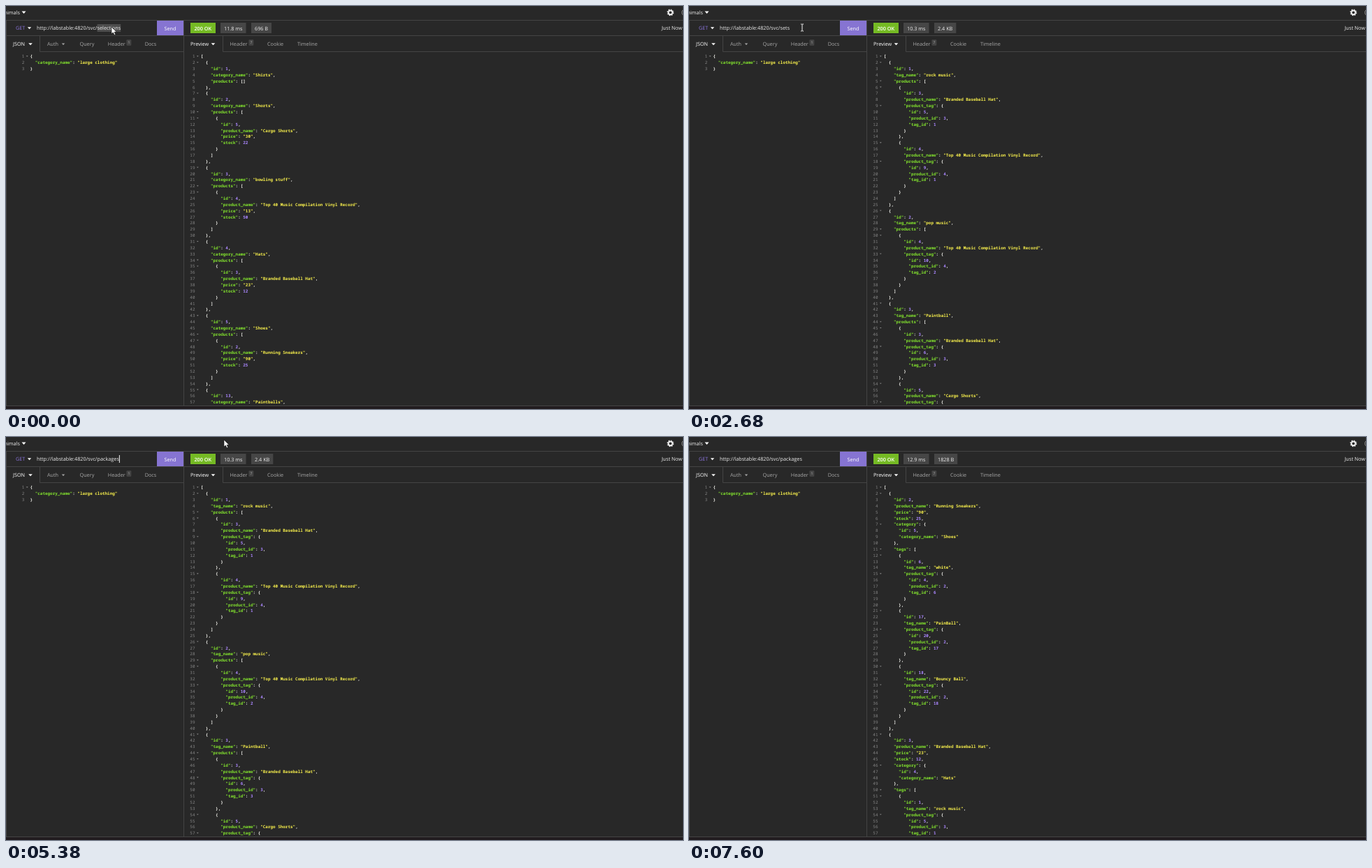
An HTML page that plays this animation: 969x578 px, repeating every 7.99 s.

```html
<!DOCTYPE html>
<html lang="en">
<head>
<meta charset="utf-8">
<title>API client</title>
<style>
  html, body { margin: 0; width: 100%; height: 100%; overflow: hidden; background: #282828; }
  svg { display: block; width: 969px; height: 578px; }
  text { font: 7.28px "Open Sans", "Noto Sans", sans-serif; fill: #eee; white-space: pre; text-rendering: geometricPrecision; }
  .code text { font: 600 5.94px "Noto Sans Mono", "DejaVu Sans Mono", monospace; fill: #f8f8f2; }
  .code .num { font-weight: 400; fill: #868686; text-anchor: end; }
  .code .key { fill: #82e22e; }
  .code .str { fill: #f6ee4c; }
  .code .val { fill: #ab87ff; }
  .mid { text-anchor: middle; }
  .rule { stroke: #444; fill: none; }
</style>
</head>
<body>
<svg id="stage" viewBox="0 0 969 578"></svg>
<script>
const LOOP = 7990;
const stage = document.getElementById('stage');

function add(parent, tag, attrs = {}, content = '') {
  const el = document.createElementNS('http://www.w3.org/2000/svg', tag);
  for (const name in attrs) el.setAttribute(name, attrs[name]);
  el.textContent = content;
  parent.append(el);
  return el;
}
const group = (parent, attrs) => add(parent, 'g', attrs);
const label = (parent, x, y, content, attrs) => add(parent, 'text', { x, y, ...attrs }, content);
const box = (parent, x, y, width, height, fill, attrs) => add(parent, 'rect', { x, y, width, height, fill, ...attrs });
const rule = (parent, d) => add(parent, 'path', { d, class: 'rule' });
const caretDown = (parent, x, y, fill, w = 6) =>
  add(parent, 'path', { d: `M${x - w / 2} ${y - w * .28}h${w}l${-w / 2} ${w * .56}z`, fill });
const show = (el, on) => el.setAttribute('visibility', on ? 'visible' : 'hidden');

// ---- JSON documents ----
const hat = 'Branded Baseball Hat', vinyl = 'Top 40 Music Compilation Vinyl Record';
const item = (id, product_name, price, stock) => ({ id, product_name, price, stock });
const category = (id, category_name, ...products) => ({ id, category_name, products });
const link = (id, product_id, tag_id) => ({ id, product_id, tag_id });
const tagged = (id, product_name, linkId, tagId) => ({ id, product_name, product_tag: link(linkId, id, tagId) });
const tag = (id, tag_name, ...products) => ({ id, tag_name, products });
const tagOf = (id, tag_name, linkId, productId) => ({ id, tag_name, product_tag: link(linkId, productId, id) });

const categories = [
  category(1, 'Shirts'),
  category(2, 'Shorts', item(5, 'Cargo Shorts', '30', 22)),
  category(3, 'bowling stuff', item(4, vinyl, '13', 50)),
  category(4, 'Hats', item(3, hat, '23', 12)),
  category(5, 'Shoes', item(2, 'Running Sneakers', '90', 25)),
  category(13, 'Paintballs'),
];
const tags = [
  tag(1, 'rock music', tagged(3, hat, 5, 1), tagged(4, vinyl, 9, 1)),
  tag(2, 'pop music', tagged(4, vinyl, 10, 2)),
  tag(3, 'Paintball', tagged(3, hat, 6, 3), tagged(5, 'Cargo Shorts', 7, 3)),
];
const products = [
  { ...item(2, 'Running Sneakers', '90', 25), category: { id: 5, category_name: 'Shoes' },
    tags: [tagOf(6, 'white', 4, 2), tagOf(17, 'PainBall', 20, 2), tagOf(18, 'Bouncy Ball', 22, 2)] },
  { ...item(3, hat, '23', 12), category: { id: 4, category_name: 'Hats' },
    tags: [tagOf(1, 'rock music', 5, 3)] },
];

// Draws highlighted JSON; returns the group of fold markers.
function editor(parent, data, x) {
  const code = group(parent, { class: 'code' });
  const folds = group(code);
  JSON.stringify(data, null, 2).split('\n').slice(0, 57).forEach((line, i) => {
    const y = 74.3 + i * 8.857;
    label(code, x - 8.2, y, i + 1, { class: 'num' });
    if (/[{[]$/.test(line)) caretDown(folds, x - 4.4, y - 2.2, '#858585', 2.8);
    const row = label(code, x, y, '');
    const [, indent, key, rest] = line.match(/^(\s*)("\w+"(?=:))?(.*)$/);
    const span = (content, cls) => content && add(row, 'tspan', { class: cls }, content);
    span(indent, '');
    span(key, 'key');
    for (const part of rest.match(/"[^"]*"|\d+|[^"\d]+/g) || [])
      span(part, part[0] === '"' ? 'str' : /\d/.test(part) ? 'val' : '');
  });
  return folds;
}

// ---- static frame ----
const white = '#fff', grey = '#a8a8a8';
box(stage, 0, 0, 969, 578, '#282828');
label(stage, -2.5, 12, 'nimals');
caretDown(stage, 25.5, 9.3, white);
const gear = group(stage, { transform: 'translate(951 9.3)', fill: 'none', stroke: '#eee' });
add(gear, 'circle', { r: 2.9, 'stroke-width': 2 });
add(gear, 'circle', { r: 4.3, 'stroke-width': 1.2, 'stroke-dasharray': '1.7 1.677' });
add(stage, 'circle', { cx: 972.5, cy: 9.3, r: 5, fill: 'none', stroke: '#aaa', 'stroke-width': .8 });

const selection = box(stage, 131, 26, 35, 11, '#4d4d4d');
label(stage, 14, 34.4, 'GET', { style: 'fill:#8a74dc' });
caretDown(stage, 33.5, 31.8, white, 5.4);
const url = label(stage, 44, 34.4, '');
const caret = box(stage, 44, 26, 1, 11, '#f4f4f4');
const send = box(stage, 216, 21, 38, 21, '#8674d2');
label(stage, 235, 34.6, 'Send', { class: 'mid', style: 'fill:#fff' });

function tabs(parent, items) {
  for (const [x, name, active] of items)
    label(parent, x, 57.4, name, { style: `fill:${active ? white : grey}` });
}
function badge(parent, x, n) {
  box(parent, x, 48.3, 6.8, 8.4, '#444', { rx: 1 });
  label(parent, x + 3.4, 54.4, n, { class: 'mid', style: 'font-size:5px;fill:#bbb' });
}
tabs(stage, [[10, 'JSON', 1], [59, 'Auth'], [105.5, 'Query'], [145.8, 'Header'], [198.7, 'Docs']]);
caretDown(stage, 35, 54.7, white, 5.6);
caretDown(stage, 82, 54.7, grey, 4.6);
badge(stage, 172.5, 1);
editor(stage, { category_name: 'large clothing' }, 34.6);

const pane = group(stage);
box(pane, 264, 24, 36, 15, '#75ba24');
label(pane, 281.8, 34.6, '200 OK', { class: 'mid', style: 'font-weight:600;fill:#fff' });
const pills = [307, 351].map(x => ({ bg: box(pane, x, 24, 30, 15, '#464646'), text: label(pane, x + 5, 34.6, '') }));
label(pane, 968, 34.4, 'Just Now', { 'text-anchor': 'end' });
tabs(pane, [[264, 'Preview', 1], [320.5, 'Header'], [374, 'Cookie'], [417, 'Timeline']]);
caretDown(pane, 296.5, 54.7, white, 5.6);
badge(pane, 347.5, 7);

const responses = [
  { at: -1000, info: ['11.8 ms', '696 B'], data: categories },
  { at: 2110, info: ['10.3 ms', '2.4 KB'], data: tags },
  { at: 6260, info: ['12.9 ms', '1828 B'], data: products },
];
for (const r of responses) {
  r.view = group(pane);
  r.folds = editor(r.view, r.data, 278.7);
}

rule(stage, 'M0 20.5H969M.5 20V573M0 42.5H969M48.5 42V65.5H254M310.5 42V65.5H969M254.5 20V573');
box(stage, 0, 574, 969, 4, '#211c1f');

// ---- loading overlay ----
const overlay = group(stage);
box(overlay, 255, 21, 714, 553, '#1c1c1c', { opacity: .77 });
label(overlay, 621.3, 270.6, 'Loading...', { class: 'mid', style: 'font-size:11.5px' });
const spinner = group(overlay);
for (const turn of [0, 180]) {
  const half = group(spinner, { transform: `rotate(${turn})` });
  add(half, 'path', { d: 'M-11.4 -2.6A11.5 11.5 0 0 1 8.8 -7.4', fill: 'none', stroke: '#dcdcdc', 'stroke-width': 4.8 });
  add(half, 'path', { d: 'M14 -13V-2.2H3.2Z', fill: '#dcdcdc' });
}
box(overlay, 586.2, 337.2, 70.6, 18.6, 'none', { stroke: '#8c8c8c', 'stroke-width': .8, rx: 1.5 });
label(overlay, 621.3, 349.3, 'Cancel Request', { class: 'mid' });
rule(stage, 'M0 573.5H969');

// ---- pointer ----
const pointer = group(stage);
const shape = (d, fill, stroke, width) => add(pointer, 'path', { d, fill, stroke, 'stroke-width': width, 'stroke-linejoin': 'round' });
const shapes = {
  arrow: shape('M0 0V10L2.3 7.9L4 11.6L5.7 10.9L4.1 7.3H7.2Z', '#fff', '#111', .6),
  hand: shape('M-1 .6Q0 -.8 1 .6V4.6L4.6 5.5Q5.6 6 5.5 7.2L4.6 11.6H-.6L-3.4 7.4Q-3 6 -1 7.4Z', '#fff', '#111', .6),
  beam: shape('M-2 -5H-.6L0 -4.4L.6 -5H2M0 -4.4V4.4M-2 5H-.6L0 4.4L.6 5H2', 'none', '#f4f4f4', 1),
};
const path = [
  [0, 151, 30], [1260, 151, 31], [1850, 226, 29], [2360, 226, 29], [2680, 162, 31], [2860, 158, 31],
  [3340, 158, 31], [3500, 289, 20], [5260, 289, 20], [5380, 312, 4], [5480, 320, 3], [5950, 223, 29],
  [6850, 223, 29], [7580, 885, 582], [LOOP, 885, 582],
];
function pointerAt(t) {
  const i = path.findIndex(p => p[0] > t);
  const [t0, x0, y0] = path[i - 1], [t1, x1, y1] = path[i];
  const u = (t - t0) / (t1 - t0), k = u * u * (3 - 2 * u);
  return [x0 + (x1 - x0) * k, y0 + (y1 - y0) * k];
}

// ---- address typing ----
const base = 'http://labstable:4820/svc/';
const firstKeys = [340, 500, 640, 770];
const secondKeys = [4210, 4300, 4400, 4500, 4590, 4690, 4900, 4960];
const typed = (word, keys, t) => word.slice(0, keys.filter(k => k <= t).length);
const wordAt = t => t < 340 ? 'selections' : t < 4050 ? typed('sets', firstKeys, t) : typed('packages', secondKeys, t);
const sends = [1950, 5970];
const caretResets = [...firstKeys, sends[0], 3000, 4050, ...secondKeys, sends[1]];

function draw(t) {
  url.textContent = base + wordAt(t);
  const start = 44 + url.getSubStringLength(0, base.length);
  const end = 44 + url.getComputedTextLength();

  const selected = t < 340 || (t >= 3120 && t < 4050);
  show(selection, selected);
  selection.setAttribute('x', start);
  selection.setAttribute('width', end - start);

  const reset = caretResets.filter(k => k <= t).pop() ?? 0;
  show(caret, !selected && (t - reset) % 1000 < 500);
  caret.setAttribute('x', sends.includes(reset) ? 44 : end);

  const [x, y] = pointerAt(t);
  const inBar = y > 21 && y < 43;
  const kind = t < 50 ? 'arrow' : inBar && x < 216 ? 'beam' : inBar && x < 254 ? 'hand' : 'arrow';
  const visible = t < 50 || (t >= 1260 && t < 7600);
  for (const name in shapes) show(shapes[name], visible && name === kind);
  pointer.setAttribute('transform', `translate(${x} ${y})`);
  send.setAttribute('fill', kind === 'hand' ? '#6b5ca8' : '#8674d2');

  const current = responses.filter(r => r.at <= t).pop();
  for (const r of responses) r.view.style.display = r === current ? '' : 'none';
  show(current.folds, t - current.at >= 560);
  pills.forEach(({ bg, text }, i) => {
    text.textContent = current.info[i];
    bg.setAttribute('width', text.getComputedTextLength() + 10);
  });

  const loadStart = [1960, 6100].find((s, i) => t >= s && t < responses[i + 1].at);
  show(overlay, loadStart !== undefined);
  spinner.setAttribute('transform', `translate(621.3 304) rotate(${(t - (loadStart ?? t)) * .18})`);
}

const begin = performance.now();
function tick() {
  draw((performance.now() - begin) % LOOP);
  requestAnimationFrame(tick);
}
tick();
</script>
</body>
</html>
```
